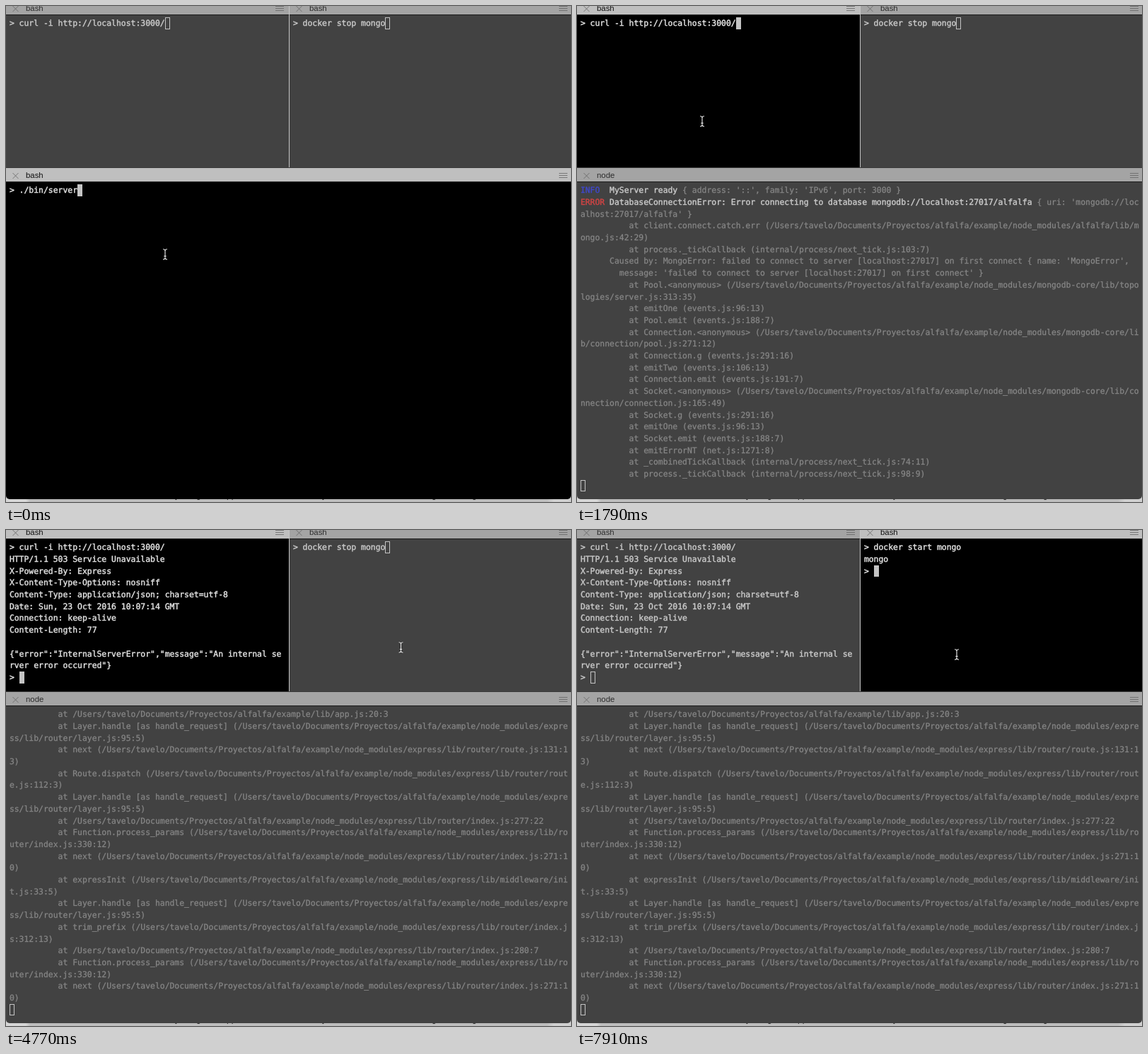
Animation of 799x701 px, one loop 8000 ms. Source, as an HTML page:

```html
<!DOCTYPE html>
<html lang="en">
<head>
<meta charset="utf-8">
<title>Terminal session</title>
<style>
html, body { margin: 0; width: 100%; height: 100%; overflow: hidden; }
#stage { position: relative; width: 799px; height: 701px; overflow: hidden; background: linear-gradient(90deg, #d6d6d6 28px, #bdbdbd 34px 765px, #d0d0d0 775px); }
#page span { position: absolute; top: 684px; font: 12px/14px "Liberation Sans", Arial, sans-serif; color: #222; }
#split { position: absolute; left: 400px; top: 0; width: 1px; height: 228px; background: #c6c6c6; }

.pane {
  --bg: #424242; --bar: #a4a4a4; --title: #2c2c2c; --icon: #717171;
  --text: #c9c9c9; --dim: #868686; --info: #4048c8; --error: #d04444;
  position: absolute; overflow: hidden; background: var(--bg);
}
.pane.focus {
  --bg: #000; --bar: #bfbfbf; --title: #111; --icon: #777;
  --text: #e4e4e4; --dim: #7c7c7c; --info: #0a24f5; --error: #e4200c;
}
#curl { left: 0; top: -8px; width: 400px; height: 236px; }
#docker { left: 401px; top: -8px; width: 398px; height: 236px; }
#server { left: 0; top: 228px; width: 799px; height: 469px; border-radius: 0 0 5px 5px; }

.bar { height: 21px; box-sizing: border-box; border: solid #1a1a1a; border-width: 0 0 1px; background: var(--bar); }
#server .bar { border-top: 1px solid #3a3a3a; }
.bar b { position: absolute; left: 28px; top: 4px; font: 11.4px/15px "Liberation Sans", Arial, sans-serif; color: var(--title); }
.bar svg { position: absolute; top: 7px; width: 12px; height: 10px; fill: none; stroke: var(--icon); }
.bar .close { left: 8px; }
.bar .menu { right: 5px; }
#curl .menu { right: 7px; }

pre {
  position: absolute; left: 4.9px; top: 24.2px; margin: 0;
  font: 11.42px/16.7px "DejaVu Sans Mono", monospace;
  text-rendering: geometricPrecision; font-variant-ligatures: none;
  color: var(--text); -webkit-text-stroke: .42px;
}
.dim { color: var(--dim); -webkit-text-stroke: .28px; }
.info { color: var(--info); }
.error { color: var(--error); }
.caret { display: inline-block; vertical-align: top; box-sizing: border-box; width: 7px; height: 16.7px; border: 1px solid #c4c4c4; }
.focus .caret { background: #c4c4c4; }

#mouse { position: absolute; left: -4px; top: -8px; width: 8px; height: 16px; overflow: visible; fill: none; }
</style>
</head>
<body>
<div id="stage">
  <div id="page"></div>
  <div id="curl" class="pane"></div>
  <div id="docker" class="pane"></div>
  <div id="server" class="pane"></div>
  <div id="split"></div>
  <svg id="mouse" viewBox="0 0 8 16">
    <defs><path id="beam" d="M1 .8Q3.6.8 4 2.6Q4.4.8 7 .8M4 2.6V13.4M1 15.2Q3.6 15.2 4 13.4Q4.4 15.2 7 15.2M2.4 10.5H5.6"/></defs>
    <use href="#beam" stroke="#000" stroke-width="2.2" stroke-opacity=".5"/>
    <use href="#beam" stroke="#f4f4f4" stroke-width="1.1"/>
  </svg>
</div>
<script>
const LOOP = 8000, COLS = 115;
const $ = id => document.getElementById(id);
const escapeHtml = s => s.replace(/&/g, '&amp;').replace(/</g, '&lt;');
const tag = (name, s) => `<span class="${name}">${escapeHtml(s)}</span>`;

// Stack traces, hard-wrapped at the terminal width
const app = '/Users/tavelo/Documents/Proyectos/alfalfa/example';
const mods = app + '/node_modules';
const router = mods + '/express/lib/router';
const core = mods + '/mongodb-core/lib';
const wrap = line => line.match(new RegExp(`.{1,${COLS}}`, 'g')).join('\n');
const trace = calls => calls.map(c => wrap(' '.repeat(10) + 'at ' + c)).join('\n');

const layer = `Layer.handle [as handle_request] (${router}/layer.js:95:5)`;
const params = `Function.process_params (${router}/index.js:330:12)`;
const next = `next (${router}/index.js:271:10)`;

const startup =
  tag('info', 'INFO') + '  MyServer ready ' + tag('dim', "{ address: '::', family: 'IPv6', port: 3000 }") + '\n' +
  tag('error', 'ERROR') + ' DatabaseConnectionError: Error connecting to database mongodb://localhost:27017/alfalfa ' +
  tag('dim', "{ uri: 'mongodb://loc\nalhost:27017/alfalfa' }\n" + trace([
    `client.connect.catch.err (${mods}/alfalfa/lib/mongo.js:42:29)`,
    'process._tickCallback (internal/process/next_tick.js:103:7)',
  ]) + `
      Caused by: MongoError: failed to connect to server [localhost:27017] on first connect { name: 'MongoError',
        message: 'failed to connect to server [localhost:27017] on first connect' }
` + trace([
    `Pool.<anonymous> (${core}/topologies/server.js:313:35)`,
    'emitOne (events.js:96:13)',
    'Pool.emit (events.js:188:7)',
    `Connection.<anonymous> (${core}/connection/pool.js:271:12)`,
    'Connection.g (events.js:291:16)',
    'emitTwo (events.js:106:13)',
    'Connection.emit (events.js:191:7)',
    `Socket.<anonymous> (${core}/connection/connection.js:165:49)`,
    'Socket.g (events.js:291:16)',
    'emitOne (events.js:96:13)',
    'Socket.emit (events.js:188:7)',
    'emitErrorNT (net.js:1271:8)',
    '_combinedTickCallback (internal/process/next_tick.js:74:11)',
    'process._tickCallback (internal/process/next_tick.js:98:9)',
  ]) + '\n');

const failure = tag('dim', trace([
  `${app}/lib/app.js:20:3`,
  layer,
  `next (${router}/route.js:131:13)`,
  `Route.dispatch (${router}/route.js:112:3)`,
  layer,
  `${router}/index.js:277:22`,
  params,
  next,
  `expressInit (${mods}/express/lib/middleware/init.js:33:5)`,
  layer,
  `trim_prefix (${router}/index.js:312:13)`,
  `${router}/index.js:280:7`,
  params,
  next,
]) + '\n');

const request = '> curl -i http://localhost:3000/';
const response = `
HTTP/1.1 503 Service Unavailable
X-Powered-By: Express
X-Content-Type-Options: nosniff
Content-Type: application/json; charset=utf-8
Date: Sun, 23 Oct 2016 10:07:14 GMT
Connection: keep-alive
Content-Length: 77

{"error":"InternalServerError","message":"An internal se
rver error occurred"}
> `;

// Each track lists [start time in ms, value]
const screens = {
  curl: [[0, request], [2830, request + ' '], [3730, request + response]],
  docker: [
    [0, '> docker stop mongo'],
    [6120, request + 'items'],
    [6410, '> docker start mongo'],
    [7460, '> docker start mongo\n'],
    [7910, '> docker start mongo\nmongo\n> '],
  ],
  server: [[0, '> ./bin/server'], [440, '> ./bin/server\n'], [1190, startup], [3730, failure]],
};
const focus = [[0, 'server'], [1790, 'curl'], [5370, 'docker']];
const serverTitle = [[0, 'bash'], [1490, 'node']];
const mouse = [
  [0, [225, 351]], [1190, [217, 288]], [1340, [193, 210]], [1490, [178, 165]], [1640, [177, 163]],
  [4330, [218, 152]], [4470, [378, 149]], [4620, [550, 164]], [4770, [558.5, 166]],
  [7760, [540, 168]], [7910, [537, 176]],
];
const at = (track, t) => track.filter(([start]) => start <= t).pop()[1];

for (const id in screens) {
  $(id).innerHTML = `<div class="bar">
    <svg class="close"><path d="M1.5 1L9.5 9M9.5 1L1.5 9"/></svg><b>bash</b>
    <svg class="menu"><path d="M0 1.5H12M0 4.5H12M0 7.5H12"/></svg></div><pre></pre>`;
}
const behind = [['y', 239], ['g', 269], ['pp', 312], ['y', 447], ['g', 602], ['g', 659]];
$('page').innerHTML = behind.map(([s, x]) => `<span style="left:${x}px">${s}</span>`).join('');

const shown = {};
function update(key, value, apply) {
  if (shown[key] !== value) apply(shown[key] = value);
}

function draw() {
  const t = performance.now() % LOOP;
  const active = at(focus, t);
  for (const id in screens) {
    const pane = $(id);
    pane.classList.toggle('focus', id === active);
    update(id, at(screens[id], t), text => {
      pane.querySelector('pre').innerHTML = text + '<i class="caret"></i>';
    });
  }
  update('title', at(serverTitle, t), s => { $('server').querySelector('b').textContent = s; });
  const [x, y] = at(mouse, t);
  $('mouse').style.transform = `translate(${x}px, ${y}px)`;
  requestAnimationFrame(draw);
}
draw();
</script>
</body>
</html>
```
